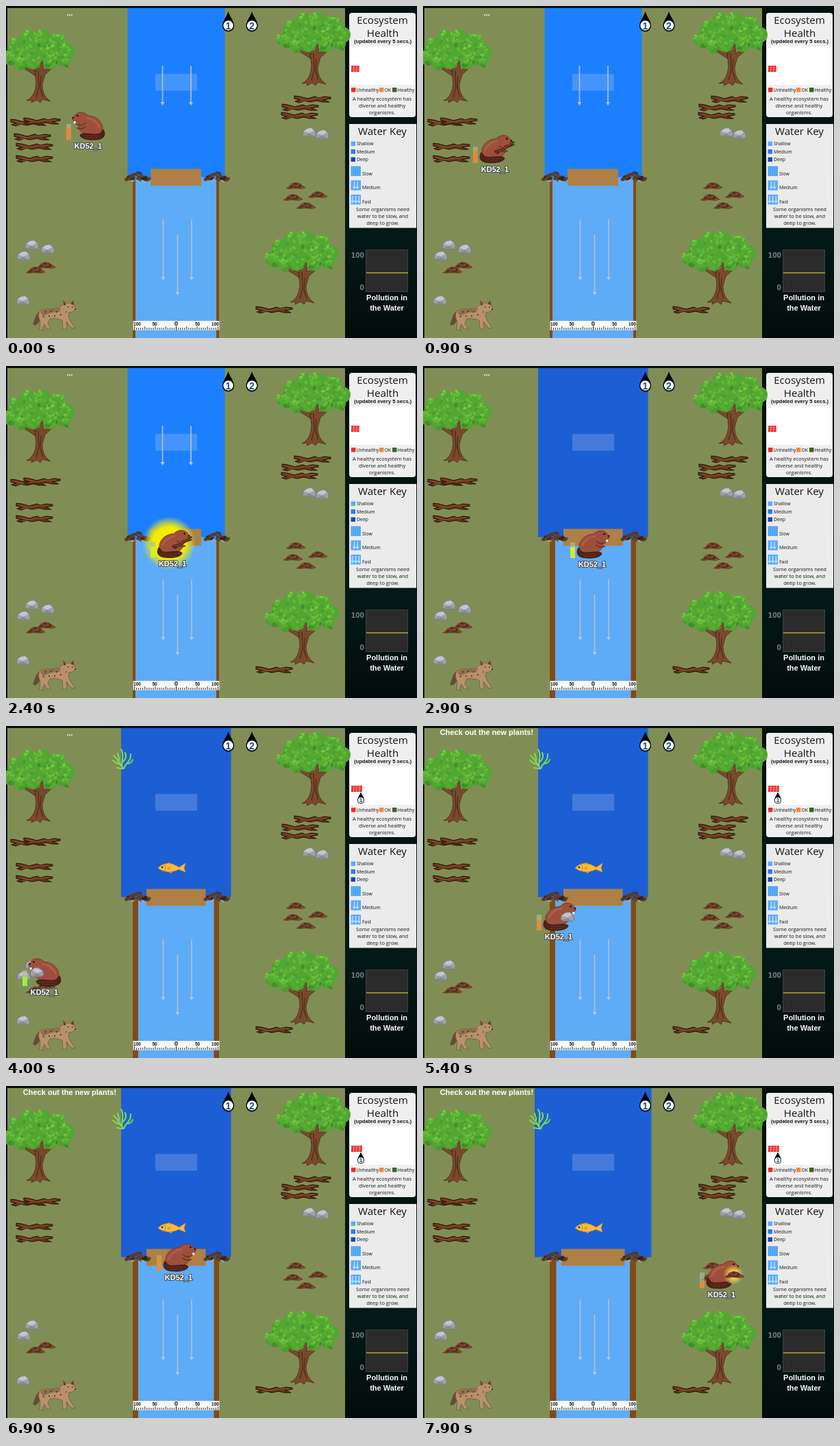
These frames come from a looping animation (600 by 484 pixels, 8000 ms). An HTML page:

```html
<!DOCTYPE html>
<html lang="en">
<head>
<meta charset="utf-8">
<title>Beaver dam</title>
<style>
  html, body { margin: 0; width: 100%; height: 100%; overflow: hidden; background: #03110f; }
  svg { display: block; }
  text { font-family: "Open Sans", "Noto Sans", sans-serif; font-weight: 500; fill: #151515; }
  .mid { text-anchor: middle; }
  .bold { font-family: "Liberation Sans", Arial, sans-serif; font-weight: bold; }
  .title { font-size: 15.1px; }
  .note { font-size: 7.5px; }
  .key { font-size: 6.9px; }
  .white { fill: #fff; font-size: 11px; }
  .name { fill: #fff; font-size: 11px; stroke: #4a4a4a; stroke-width: 2px; paint-order: stroke; }
  .digit { font-size: 14px; fill: #174b87; }
</style>
</head>
<body>
<svg id="stage" width="600" height="484" viewBox="0 0 600 484">
  <defs>
    <linearGradient id="panel" x2="0" y2="1">
      <stop offset="0" stop-color="#03100f"/>
      <stop offset=".7" stop-color="#031917"/>
      <stop offset="1" stop-color="#020c0c"/>
    </linearGradient>
    <radialGradient id="shine">
      <stop offset="0" stop-color="#fff200"/>
      <stop offset=".62" stop-color="#f0ea08"/>
      <stop offset=".82" stop-color="#d4e02c" stop-opacity=".6"/>
      <stop offset="1" stop-color="#c0dc60" stop-opacity="0"/>
    </radialGradient>
    <radialGradient id="softShine">
      <stop offset="0" stop-color="#ffe98a"/>
      <stop offset=".5" stop-color="#f0c850" stop-opacity=".85"/>
      <stop offset="1" stop-color="#e0c050" stop-opacity="0"/>
    </radialGradient>
    <pattern id="dots" width="3" height="3" patternUnits="userSpaceOnUse">
      <rect width="3" height="3" fill="#58adfa"/>
      <rect width="1" height="1" fill="#2f86dc"/>
    </pattern>

    <g id="tree">
      <path d="M48 50 L51 78 C50 90 47 99 37 104 L45 103 L44 107 L52 103 L57 107 L60 102 L72 105 C63 98 60 91 60 80 L64 66 L82 50 L78 47 L62 60 L60 46 L50 46 L51 62 L30 49 L27 53 L50 68Z"
        fill="#7b492d" stroke="#4a2a15" stroke-width=".8"/>
      <path d="M54 60 L55 84 L51 99 M58 68 L57 86 L61 99" fill="none" stroke="#4d2a17" stroke-width="1.2"/>
      <g id="leaves"></g>
    </g>
    <g id="log">
      <path d="M-27 -5 L-19 -4 L-8 -1 L3 -4 L8 -2 L17 -4 L26 -3 L26 -1 L15 1 L24 4 L14 4 L6 2 L-4 4 L-12 2 L-20 5 L-26 3 L-19 1 L-27 -1Z"
        fill="#6b391b" stroke="#24110a" stroke-width="1.1" stroke-linejoin="round"/>
      <path d="M-22 -2.5 L-8 1 L4 -1.5 L20 -2 M-18 3 L-9 1" fill="none" stroke="#98592c" stroke-width=".8"/>
    </g>
    <g id="rock">
      <path d="M-10 4 L-9 -2 L-4 -6 L3 -7 L8 -3 L10 3 L7 7 L-7 6Z" fill="#9da1a8" stroke="#70747b" stroke-width=".8" stroke-linejoin="round"/>
      <path d="M-8 -1 L-3 -5 L3 -6 L6 -2 L0 1Z" fill="#c4c7cc"/>
      <path d="M-8 5 L0 2 L7 6Z" fill="#83888f"/>
    </g>
    <g id="mud">
      <path d="M-15 4 L-10 1 L-7 -3 L-1 -5 L5 -4 L9 -1 L15 3 L9 5 L-2 4 L-9 5Z" fill="#70402a"/>
      <path d="M-9 2 L-4 0 M-3 -3 L2 -2 M2 2 L7 1 M5 -2 L8 0 M-1 3 L1 2" stroke="#4a2715" stroke-width="1.4"/>
      <path d="M-7 -1 L-4 -3 M1 0 L4 -1 M8 3 L11 3" stroke="#9a6040" stroke-width="1"/>
    </g>
    <g id="pile"></g>
    <g id="drop">
      <path d="M0 -16 C2 -8 8.5 -3 8.5 5 A8.5 8.5 0 0 1 -8.5 5 C-8.5 -3 -2 -8 0 -16Z" fill="#000"/>
      <circle cy="4.5" r="7.2" fill="#fff"/>
    </g>
    <g id="beaverShape" stroke-linejoin="round">
      <circle cx="10" cy="-15" r="2.6" fill="#7d3a2b" stroke="#5a281c" stroke-width=".8"/>
      <path d="M-20 9 C-22 -4 -10 -13 1 -13 C6 -19 17 -20 21 -13 L24 -9 C24 -5 20 -4 14 -3 C16 4 14 10 7 13 C-4 16 -18 15 -20 9Z"
        fill="#9e4f3c" stroke="#6b3226" stroke-width=".8"/>
      <path d="M-16 5 C-12 -5 -4 -9 4 -10" fill="none" stroke="#b1634e" stroke-width="2"/>
      <path d="M6 -2 C10 2 13 2 18 -1 M5 3 C9 7 13 6 17 5" fill="none" stroke="#74382a" stroke-width="2.2" stroke-linecap="round"/>
      <path d="M19 -5 h3 v3.5 h-2z" fill="#fff4dc"/>
      <circle cx="16.5" cy="-13" r="1.3" fill="#160b08"/>
      <circle cx="23" cy="-10" r="1.4" fill="#35150f"/>
      <path d="M-21 7 C-25 14 -24 22 -8 22 C4 23 13 19 13 15 C9 11 -2 14 -12 14 C-17 14 -18 10 -21 7Z" fill="#512318" stroke="#34150c" stroke-width=".8"/>
      <path d="M-17 16 L9 16 M-14 19.5 L4 19.5 M-10 15 L-12 21 M-3 15 L-5 21 M4 15 L2 20" stroke="#70382a" stroke-width=".6"/>
    </g>
  </defs>

  <rect width="600" height="484" fill="url(#panel)"/>
  <rect x="2" y="3" width="493" height="481" fill="#808e56"/>

  <g id="river">
    <rect x="185" y="249" width="126" height="235" fill="#824a18"/>
    <rect id="lower" y="249" height="235" fill="#5eabf7"/>
    <rect id="upper" y="3" height="246.5"/>
    <rect x="218" y="99" width="61" height="24.5" fill="#cfe0f0" opacity=".22"/>
    <g id="flow"></g>
    <rect id="dam" y="237.5" height="24.5" fill="#ae8045"/>
  </g>
  <use href="#pile" x="192.5" y="250"/>
  <use href="#pile" x="308" y="250"/>

  <g id="ruler">
    <rect x="185.5" y="459" width="126" height="13.5" fill="#f7f7f5"/>
    <path id="ticks" stroke="#111" stroke-width=".8"/>
  </g>

  <rect x="501" y="10" width="97" height="152" rx="4" fill="#efefef"/>
  <rect x="502" y="59" width="95" height="56" fill="#fff"/>
  <g class="mid">
    <text class="title" x="549.5" y="26">Ecosystem</text>
    <text class="title" x="550" y="45">Health</text>
    <text class="bold" x="550" y="54" font-size="7.6">(updated every 5 secs.)</text>
    <text class="note" x="549" y="138">A healthy ecosystem has</text>
    <text class="note" x="549" y="148">diverse and healthy</text>
    <text class="note" x="549" y="158">organisms.</text>
  </g>
  <g id="health"></g>
  <g id="healthDrop" transform="translate(518 105.5) scale(.6)">
    <use href="#drop"/>
    <text class="mid bold digit" y="9">1</text>
  </g>
  <g id="legend"></g>

  <rect x="501" y="172" width="98" height="151.5" fill="#ebebeb"/>
  <text class="title mid" x="549.5" y="188">Water Key</text>
  <g id="waterKey"></g>
  <g class="mid note">
    <text x="550" y="299">Some organisms need</text>
    <text x="550" y="309">water to be slow, and</text>
    <text x="550" y="319">deep to grow.</text>
  </g>

  <rect x="525.5" y="355.5" width="61" height="61" fill="#2b2b2b" stroke="#3e4241"/>
  <path d="M526 389 H587" stroke="#b9a53b" stroke-width="1.5"/>
  <g text-anchor="end" font-size="11.5">
    <text class="bold" x="523" y="366.5" style="fill:#7c8785">100</text>
    <text class="bold" x="523" y="414" style="fill:#7c8785">0</text>
  </g>
  <text class="white bold mid" x="556" y="429">Pollution in</text>
  <text class="white bold mid" x="556" y="443.5">the Water</text>

  <g id="things"></g>
  <g id="coyote">
    <path d="M50 445 C43 447 43 456 39 464 C43 468 48 463 51 455Z" fill="#654d38"/>
    <path d="M49 445 C56 440 68 443 77 440 L82 436 L84 429 L88 433 L93 433 L98 429 L99 436 L102 442 L97 446 L92 447 L91 453 L95 461 L101 469 L96 470 L88 460 L89 471 L83 471 L82 458 C75 456 69 455 64 456 L61 463 L66 471 L60 471 L56 464 L53 470 L56 473 L49 472 L50 460 C47 454 47 449 49 445Z"
      fill="#b8916b" stroke="#725640" stroke-width=".8"/>
    <path d="M50 446 C58 440 70 444 80 440 L78 446 L66 447 L54 452Z" fill="#8f6c50"/>
    <path d="M84 430 L88 435 L84 437Z M98 430 L94 434 L99 436Z" fill="#5e3c2a"/>
    <path d="M57 446h2 M65 445h2 M73 446h2 M79 450h2 M62 452h2 M70 452h2 M87 446h1.5 M90 439h1.5 M96 439h1.5 M54 453h2 M100 442h2" stroke="#3a2a20" stroke-width="1.7"/>
  </g>
  <g id="drops"></g>
  <text id="message" class="white bold mid" x="93"></text>

  <g id="life">
    <g fill="none" stroke="#80dc4e" stroke-width="2" stroke-linecap="round">
      <path d="M171 62 C166 56 164 48 157 43 M168 56 C161 55 158 52 156 50 M170 61 C167 51 174 43 168 34 M171 52 C175 48 176 43 174 39 M172 62 C174 54 183 52 182 41 M176 55 C181 55 184 52 185 49 M165 50 C166 46 163 43 163 40 M171 62 C168 63 165 61 162 61"/>
    </g>
    <path d="M222 207 C228 200 237 199 245 202 L253 206 L262 200 L260 207 L262 213 L252 209 C244 214 230 214 222 207Z" fill="#f6bd3e" stroke="#cd8a2a" stroke-width=".7"/>
    <path d="M233 201 L238 199 L244 202 M236 212 L241 215 L243 212 M235 207 L240 205 L239 210Z" fill="#e89027"/>
    <path d="M231 202 C233 205 233 209 231 212" fill="none" stroke="#cf7f25"/>
    <circle cx="228" cy="206" r="1.3" fill="#222"/>
  </g>

  <g id="player">
    <circle id="glow" r="39" cx="-5" cy="-30" fill="url(#shine)"/>
    <rect x="-32" y="-32" width="7" height="23" fill="#b3b89a" opacity=".65"/>
    <rect id="energy" x="-32" width="7"/>
    <g id="beaver">
      <use href="#beaverShape"/>
      <circle id="pickGlow" cx="16" cy="2" r="15" fill="url(#softShine)"/>
      <use id="load"/>
    </g>
    <text class="name bold mid" y="4">KD52_1</text>
  </g>
</svg>

<script>
const LOOP = 8000, STEP = 100;
const NS = "http://www.w3.org/2000/svg";
const el = id => document.getElementById(id);
const set = (node, attrs) => {
  for (const k in attrs) node.setAttribute(k, attrs[k]);
  return node;
};
const add = (parent, tag, attrs, text = "") => {
  const node = set(document.createElementNS(NS, tag), attrs);
  node.textContent = text;
  parent.append(node);
  return node;
};
const show = (node, on) => { node.style.display = on ? "" : "none"; };

let seed = 7;
const rnd = () => (seed = seed * 16807 % 2147483647) / 2147483647;
const pick = list => list[Math.floor(rnd() * list.length)];

// Foliage: round clumps with small leaves, light on top and dark below
const clumps = [[12, 41, 11], [22, 25, 12], [32, 36, 13], [40, 15, 13], [61, 14, 13], [82, 19, 13],
  [96, 33, 12], [92, 46, 9], [76, 36, 13], [72, 47, 11], [46, 47, 11], [28, 50, 9], [55, 30, 17]];
const greens = ["#74ca42", "#66bd3a", "#58ae34", "#4a9c2d", "#3f8a29"];
for (const [cx, cy, r] of clumps) add(el("leaves"), "circle", { cx, cy, r, fill: "#52a632" });
for (let i = 0; i < 230; i++) {
  const [x, y, r] = pick(clumps), a = rnd() * 6.283, d = r * Math.sqrt(rnd());
  const dy = d * Math.sin(a), shade = Math.floor((dy / r + 1) * 1.7 + rnd() * 1.6);
  add(el("leaves"), "ellipse", {
    rx: 3, ry: 1.7, fill: greens[Math.min(shade, 4)],
    transform: `translate(${x + d * Math.cos(a)} ${y + dy}) rotate(${rnd() * 180})`
  });
}

// Heaps of mud and stone at both ends of the dam
for (let i = 0; i < 46; i++) {
  const x = (rnd() * 2 - 1) * 17, top = 9 - Math.abs(x) * .45;
  add(el("pile"), "ellipse", {
    cx: x, cy: 4 - rnd() * (top + 3), rx: 2.6, ry: 1.9,
    fill: pick(["#4a342a", "#2c2624", "#5a4335", "#47403e", "#63361f"])
  });
}
add(el("pile"), "path", { d: "M-11 5 L-5 5 M5 4 L10 6", stroke: "#b7b4ae", "stroke-width": 1.6 });

const arrow = (group, x, y1, y2) => {
  add(group, "path", { d: `M${x} ${y1}V${y2}`, stroke: "#b4c2d2", "stroke-width": 1.6 });
  add(group, "path", { d: `M${x - 3} ${y2 - 2}h6l-3 5z`, fill: "#b9c5d2" });
};
const fast = add(el("flow"), "g", {});
for (const x of [228.5, 270]) arrow(fast, x, 87, 142);
for (const [x, y] of [[229.5, 311], [271, 311], [250.5, 333]]) arrow(el("flow"), x, y, y + 86);

let ticks = "";
for (let i = 0; i <= 40; i++) ticks += `M${187.5 + i * 3.05} 472v${i % 5 ? -3 : -5}`;
set(el("ticks"), { d: ticks + "M248.5 467V473" });
[[191.5, 100], [217, 50], [248.5, 0], [279.5, 50], [305.5, 100]].forEach(([x, n]) =>
  add(el("ruler"), "text", { x, y: 466, class: "bold mid", "font-size": n ? 6.5 : 9.5 }, n));

const bars = [0, 1, 2, 3].map(i => {
  const g = add(el("health"), "g", {});
  add(g, "rect", { x: 504 + i * 4.1, y: 87, width: 3.5, height: 9, fill: "#f12525" });
  add(g, "path", { d: `M${504 + i * 4.1} 90h2M${505.5 + i * 4.1} 93h2`, stroke: "#ffaaa5", "stroke-width": .7 });
  return g;
});
[[504, "#ed3030", "Unhealthy"], [545, "#f08a3c", "OK"], [564, "#35691f", "Healthy"]].forEach(([x, fill, label]) => {
  add(el("legend"), "rect", { x, y: 119, width: 6.5, height: 6.5, fill });
  add(el("legend"), "text", { x: x + 7.5, y: 125, class: "key" }, label);
});
[["#5eabf7", "Shallow"], ["#2d7be8", "Medium"], ["#1b4ca7", "Deep"]].forEach(([fill, label], i) => {
  add(el("waterKey"), "rect", { x: 503.5, y: 197.5 + i * 11.5, width: 6.5, height: 6.5, fill });
  add(el("waterKey"), "text", { x: 512, y: 203 + i * 11.7, class: "key" }, label);
});
["Slow", "Medium", "Fast"].forEach((label, i) => {
  const y = 233.5 + i * 20.7;
  add(el("waterKey"), "rect", { x: 503.5, y, width: 14.5, height: 14.5, fill: i ? "#58adfa" : "url(#dots)" });
  add(el("waterKey"), "text", { x: 520, y: y + 13, class: "key" }, label);
  const n = i ? i + 1 : 0;
  for (let k = 0; k < n; k++) {
    const x = 510.7 + (k - (n - 1) / 2) * 4.5;
    add(el("waterKey"), "path", {
      d: `M${x} ${y + 2}v9m-2 -2l2 3l2 -3`, fill: "none", stroke: "#eaf4ff", "stroke-width": 1
    });
  }
});

const place = (kind, spots) => spots.map(([x, y]) => add(el("things"), "use", { href: "#" + kind, x, y }));
place("tree", [[-7, 34], [395, 9], [378, 328]]);
const logs = place("log", [[39, 191], [34, 170], [53, 168], [42, 205], [42, 223], [448, 136], [430, 148], [429, 160], [392, 443]]);
const muds = place("mud", [[438, 291], [58, 378], [43, 385], [423, 262], [419, 279], [455, 275]]);
const rocks = place("rock", [[61, 354], [38, 348], [26, 364], [25, 429], [443, 184], [462, 187]]);

[[324.5, 1], [359, 2]].forEach(([x, n]) => {
  const g = add(el("drops"), "g", { transform: `translate(${x} 24)` });
  add(g, "use", { href: "#drop" });
  add(g, "text", { y: 9.5, class: "bold mid digit" }, n);
});

// time, x, y of the name tag below the beaver
const path = [[0, 120, 204], [500, 56, 218], [700, 64, 222], [1500, 228, 284], [1700, 234, 287], [2700, 247, 289],
  [3000, 247, 289], [3800, 56, 388], [4300, 56, 388], [5400, 198, 307], [6000, 240, 285], [6700, 252, 279],
  [7100, 252, 279], [7700, 436, 304], [8000, 436, 304]];
// start, upper edges, lower edges, dam edges, upper colour
const water = [[0, 177.5, 319.5, 189, 307, 211, 285, "#1c80fe"], [2800, 168, 328.5, 193, 303.5, 205, 291.5, "#1c5fd5"],
  [7200, 163, 333.5, 194.5, 302, 202, 294.5, "#1c5fd5"]];
const carried = [[0, ""], [600, "log"], [2500, ""], [3900, "rock"], [6300, ""], [7700, "mud"]];
const facing = [[0, -1], [700, 1], [3100, -1], [4400, 1]];
// start, share of the bar filled, colour
const energy = [[0, .75, "#dc8b3c"], [1500, .7, "#d9e830"], [3500, .6, "#9cee3a"], [4500, .63, "#dc8f45"],
  [6300, .9, "#dc913f"], [7300, .4, "#e0883c"]];

const latest = (table, t) => table.filter(row => row[0] <= t).pop();
const within = (t, a, b) => t >= a && t < b;

function along(t) {
  const i = path.findIndex(p => p[0] > t), a = path[i - 1], b = path[i];
  const k = (t - a[0]) / (b[0] - a[0]);
  return [a[1] + (b[1] - a[1]) * k, a[2] + (b[2] - a[2]) * k];
}

function draw(t) {
  const [, u1, u2, l1, l2, d1, d2, fill] = latest(water, t);
  set(el("upper"), { x: u1, width: u2 - u1, fill });
  set(el("lower"), { x: l1, width: l2 - l1 });
  set(el("dam"), { x: d1, width: d2 - d1 });
  show(fast, t < 2800);

  show(logs[0], t < 600);
  show(rocks[0], t < 3900);
  show(muds[0], t < 7700);

  const alive = t >= 3600, news = t >= 4700;
  for (const node of [el("life"), el("healthDrop"), bars[3]]) show(node, alive);
  el("message").textContent = news ? "Check out the new plants!" : "...";
  set(el("message"), { y: news ? 13 : 14 });

  const [x, y] = along(t), load = latest(carried, t)[1];
  set(el("player"), { transform: `translate(${x} ${y})` });
  set(el("beaver"), { transform: `translate(1 -31) scale(${latest(facing, t)[1]} 1)` });
  set(el("load"), {
    href: load ? "#" + load : "",
    transform: load === "log" ? "translate(14 0) rotate(-28) scale(.6)" : `translate(${load === "mud" ? 17 : 12} 2)`
  });
  show(el("load"), load);
  show(el("glow"), within(t, 1400, 2500) || within(t, 5800, 6300));
  show(el("pickGlow"), t >= 7700);
  const [, share, color] = latest(energy, t);
  set(el("energy"), { y: -9 - 23 * share, height: 23 * share, fill: color });
}

function frame(now) {
  draw(Math.floor(now % LOOP / STEP) * STEP);
  requestAnimationFrame(frame);
}
draw(0);
requestAnimationFrame(frame);
</script>
</body>
</html>
```
